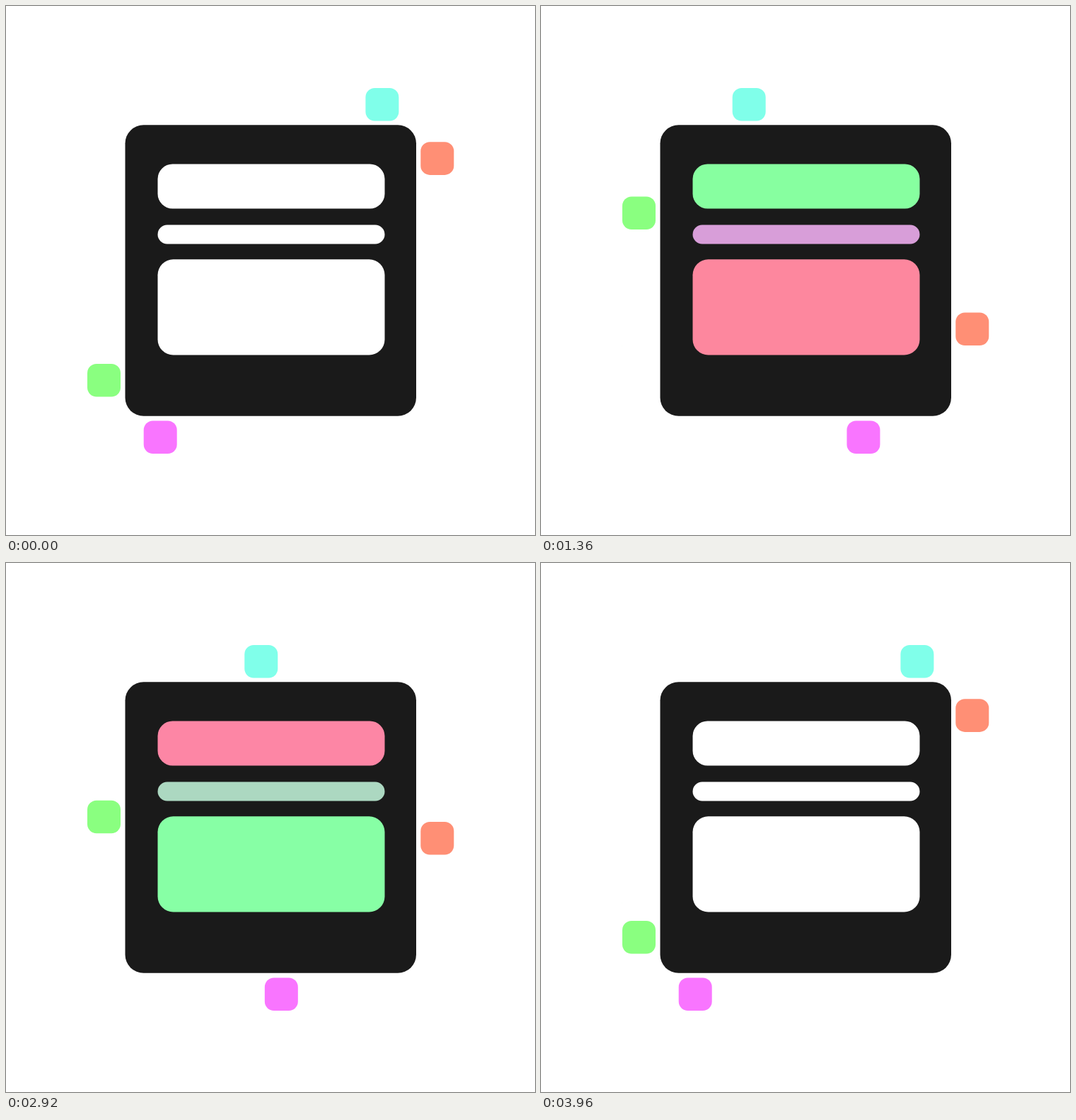
An HTML page for the animation above (4.04 s loop, 748 by 748 pixels).

```html
<!DOCTYPE html>
<html lang="en">
<head>
<meta charset="utf-8">
<title>Color blocks</title>
<style>
  html, body { margin: 0; width: 100%; height: 100%; overflow: hidden; background: #fff; }
  svg { display: block; width: 100%; height: 100%; }
</style>
</head>
<body>
<svg id="stage" viewBox="0 0 748 748"></svg>
<script>
const LOOP = 4040, STEP = 40, TURN = 2000, END = 3960, HOLD = 800;

const WHITE = [255, 255, 255];
const CYAN = [128, 255, 234];
const GREEN = [138, 255, 128];
const PINK = [249, 117, 255];
const ORANGE = [255, 143, 117];
const PALETTE = [CYAN, GREEN, PINK, ORANGE];

const stage = document.getElementById('stage');
const rgb = c => `rgb(${c.map(Math.round).join(',')})`;
const mix = (a, b, k) => a.map((v, i) => v + (b[i] - v) * k);
const smooth = u => u * u * (3 - 2 * u);

function box(x, y, w, h, r, color) {
  const el = document.createElementNS('http://www.w3.org/2000/svg', 'rect');
  const attrs = { x, y, width: w, height: h, rx: r, fill: rgb(color) };
  for (const name in attrs) el.setAttribute(name, attrs[name]);
  return stage.appendChild(el);
}

box(168.5, 168.3, 411.5, 411.5, 26, [26, 26, 26]);

const bars = [
  box(214.5, 223.5, 321, 63, 21, WHITE),
  box(214.5, 309.5, 321, 27, 13.5, WHITE),
  box(214.5, 358.3, 321, 135.2, 22, WHITE)
];

// Each tile slides along one axis by `dist` and back.
const tile = (x, y, color, axis, dist) => ({
  el: box(x, y, 47, 46.6, 13, color),
  axis, dist, from: axis === 'x' ? x : y
});
const tiles = [
  tile(508.4, 116, CYAN, 'x', -313.5),
  tile(586.3, 192.3, ORANGE, 'y', 318),
  tile(194.7, 586.5, PINK, 'x', 313.5),
  tile(115, 506, GREEN, 'y', -312)
];

function barColor(index, t) {
  const seg = Math.min(Math.floor(t / HOLD), 4);
  const start = seg * HOLD;
  const stop = seg === 4 ? END : start + HOLD;
  const key = n => n === 0 || n === 5 ? WHITE : PALETTE[(n - 1 + index) % 4];
  return mix(key(seg), key(seg + 1), (t - start) / (stop - start));
}

function draw(time) {
  const t = Math.min(Math.floor((time % LOOP) / STEP) * STEP, END);
  const k = smooth(t < TURN ? t / TURN : (END - t) / (END - TURN));
  for (const { el, axis, from, dist } of tiles) el.setAttribute(axis, from + dist * k);
  bars.forEach((el, i) => el.setAttribute('fill', rgb(barColor(i, t))));
}

let origin;
function tick(now) {
  origin ??= now;
  draw(now - origin);
  requestAnimationFrame(tick);
}
draw(0);
requestAnimationFrame(tick);
</script>
</body>
</html>
```
